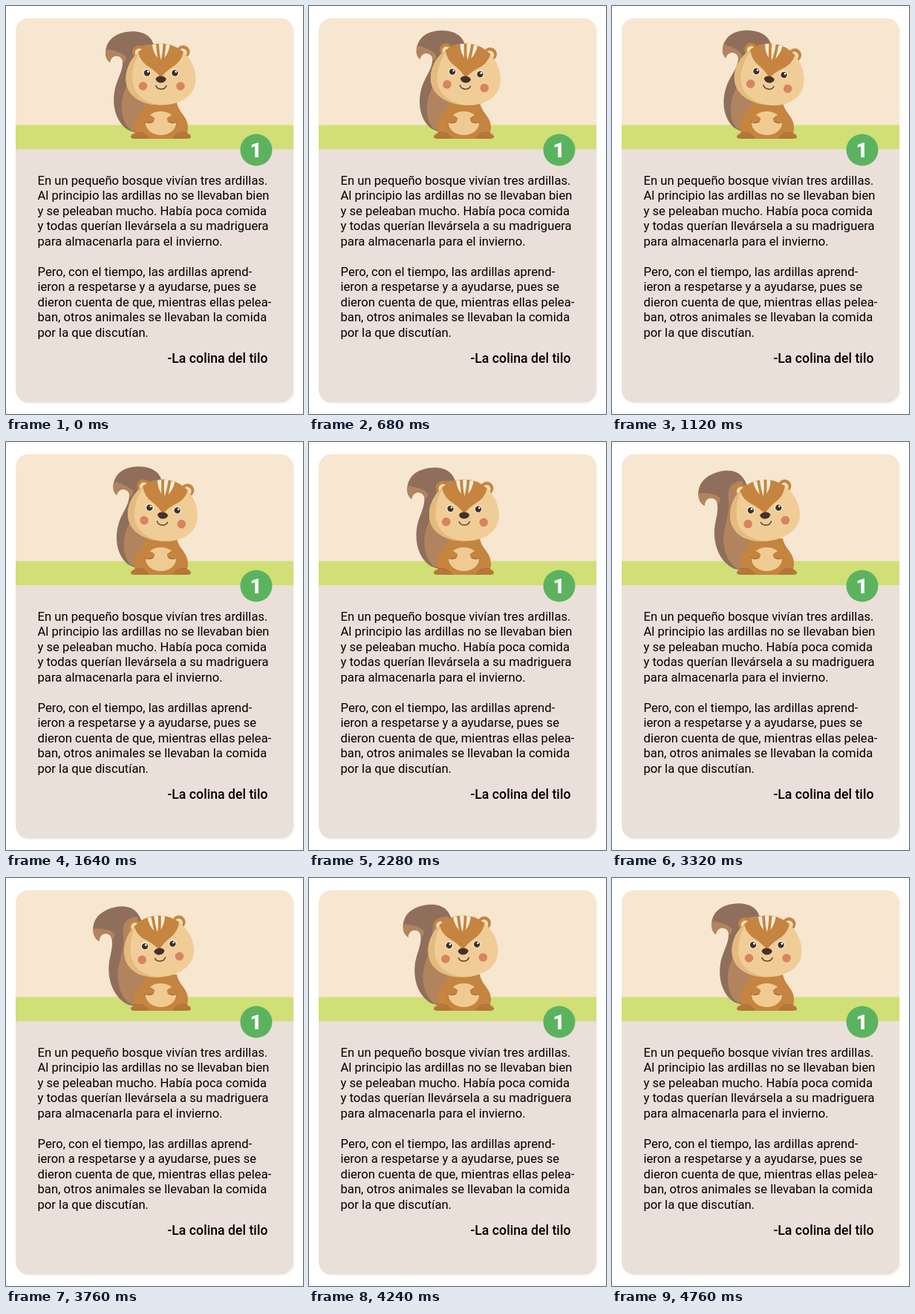
These frames come from a looping animation (400x550 px, 4800 ms). An HTML page:

```html
<!DOCTYPE html>
<html lang="es">
<head>
<meta charset="utf-8">
<style>
  html, body { margin: 0; width: 100%; height: 100%; overflow: hidden; background: #fff; }
  svg { display: block; width: 400px; height: 550px; }
  text { font-family: Roboto, sans-serif; }
  #story { font-size: 16.65px; }
</style>
</head>
<body>
<svg viewBox="0 0 400 550">
  <clipPath id="card"><rect x="13" y="16.5" width="374" height="518" rx="17"/></clipPath>
  <rect x="14" y="18" width="375" height="519" rx="18" fill="#f8f7f6"/>
  <g clip-path="url(#card)">
    <rect width="400" height="161" fill="#f7e6d0"/>
    <rect y="160.5" width="400" height="33" fill="#d0df76"/>
    <rect y="193" width="400" height="350" fill="#ebdfd9"/>
  </g>

  <g id="tail">
    <path fill="#8f6f5b" d="M140 76C132 70 132 55 141 45C152 33 180 30 192 41C202 50 204 70 200 90L198 166Q181 175 164 167C148 156 143 135 146 116C148 101 158 88 157 75C157 66 142 63 140 76Z"/>
    <path fill="#b1845f" d="M140 76C133 71 133 62 136 58C144 60 158 62 162 70C160 78 157 77 157 75C157 66 142 63 140 76Z"/>
    <path fill="#b1845f" d="M190 52C175 54 174 64 173 76C171 97 157 111 156 132C155 148 160 161 169 168L196 166V52Z"/>
  </g>

  <g id="body">
    <path fill="#c5843f" d="M188 130H230C232 140 238 145 242 152Q247 162 244 171Q250 174 249 177Q247 179 240 179H177Q168 179 168 176Q168 173 174 171Q170 162 175 152C180 144 186 140 188 130Z"/>
    <ellipse cx="208.5" cy="158" rx="20.5" ry="16" fill="#efcb92"/>
    <g id="limb">
      <path fill="#c5843f" d="M184 143Q196 147 200 151Q201 156 195 158Q187 157 182 149Z"/>
      <path fill="none" stroke="#a96c35" stroke-width="1.3" stroke-linecap="round" d="M187 156Q192 159 198 156M174 171Q185 169 190 176"/>
      <path fill="#b5763a" d="M168 177Q169 172 180 172Q191 172 193 179H177Q169 179 168 177Z"/>
    </g>
    <use href="#limb" transform="matrix(-1 0 0 1 417 0)"/>
  </g>

  <g id="head">
    <g id="ear">
      <circle cx="179" cy="62" r="9" fill="#c5843f"/>
      <circle cx="179.5" cy="63" r="5.8" fill="#f3dcb8"/>
    </g>
    <use href="#ear" transform="matrix(-1 0 0 1 417.5 0)"/>
    <path id="face" fill="#f0cd96" d="M208.5 50.5C235 50.5 255.5 74 255.5 98C255.5 121 235 133.5 208.5 133.5S161.500 121 161.500 98C161.500 74 182 50.500 208.500 50.500Z"/>
    <path fill="#e4ba7e" d="M181 60Q162 77 161.500 98C161.500 121 182 133.500 208.500 133.500Q171 128 170 98Q170 78 181 60Z"/>
    <path fill="#c5843f" d="M178 62Q191 50.500 208.500 50.500T239 62Q236 76 223 83Q214 89 208.500 97Q203 89 194 83Q181 76 178 62Z"/>
    <path fill="#fbeed8" d="M197 52.300L202 51.300Q203 62 204 70Q198 62 197 52.300ZM206 50.500H211.500Q211 64 208.700 73Q206.500 64 206 50.500ZM215.500 51.300L220.500 52.300Q219.500 62 213.500 70Q214.500 62 215.500 51.300Z"/>
    <g fill="#d8845e"><circle cx="184.500" cy="108" r="5.800"/><circle cx="235" cy="108" r="5.800"/></g>
    <g id="eye">
      <circle cx="190" cy="90" r="5.300" fill="#fff3df"/>
      <circle cx="190" cy="90.200" r="4.200" fill="#3d302d"/>
      <circle cx="191.400" cy="88.500" r="1.400" fill="#fff"/>
    </g>
    <use href="#eye" x="37.500"/>
    <path fill="#42322e" d="M201.500 98.500Q203 94.500 208.500 94.500T215.800 98.500Q214 103.500 208.700 103.500T201.500 98.500Z"/>
    <path fill="none" stroke="#5b4032" stroke-width="1.500" stroke-linecap="round" d="M202 107.500Q203.500 112 209 112T216 107.500"/>
  </g>

  <circle cx="337" cy="194" r="21.500" fill="#5cb35f"/>
  <text x="336.500" y="204" font-size="28" font-weight="900" text-anchor="middle" fill="#fff">1</text>
  <g id="story"></g>
  <text x="352.500" y="481" font-size="17.700" font-weight="500" text-anchor="end">-La colina del tilo</text>
</svg>
<script>
const lines = [
  'En un pequeño bosque vivían tres ardillas.',
  'Al principio las ardillas no se llevaban bien',
  'y se peleaban mucho. Había poca comida',
  'y todas querían llevársela a su madriguera',
  'para almacenarla para el invierno.',
  '',
  'Pero, con el tiempo, las ardillas aprend-',
  'ieron a respetarse y a ayudarse, pues se',
  'dieron cuenta de que, mientras ellas pelea-',
  'ban, otros animales se llevaban la comida',
  'por la que discutían.'
];
const byId = id => document.getElementById(id);
byId('story').innerHTML = lines
  .map((line, i) => `<text x="42.5" y="${241 + i * 20.45}">${line}</text>`).join('');

// Each key: time in ms, tail angle, head angle; eased between keys.
const keys = [[0, 0, 0], [1060, 8.2, 7.4], [3520, -10.6, -5.8], [4800, 0, 0]];

function pose(t) {
  const i = keys.findIndex(key => t < key[0]);
  const [from, to] = [keys[i - 1], keys[i]];
  const eased = (1 - Math.cos(Math.PI * (t - from[0]) / (to[0] - from[0]))) / 2;
  return [1, 2].map(k => from[k] + (to[k] - from[k]) * eased);
}

function draw() {
  const [tail, head] = pose(performance.now() % 4800);
  byId('tail').setAttribute('transform', `rotate(${tail} 187 165)`);
  byId('head').setAttribute('transform', `rotate(${head} 209 123)`);
  requestAnimationFrame(draw);
}
draw();
</script>
</body>
</html>
```
